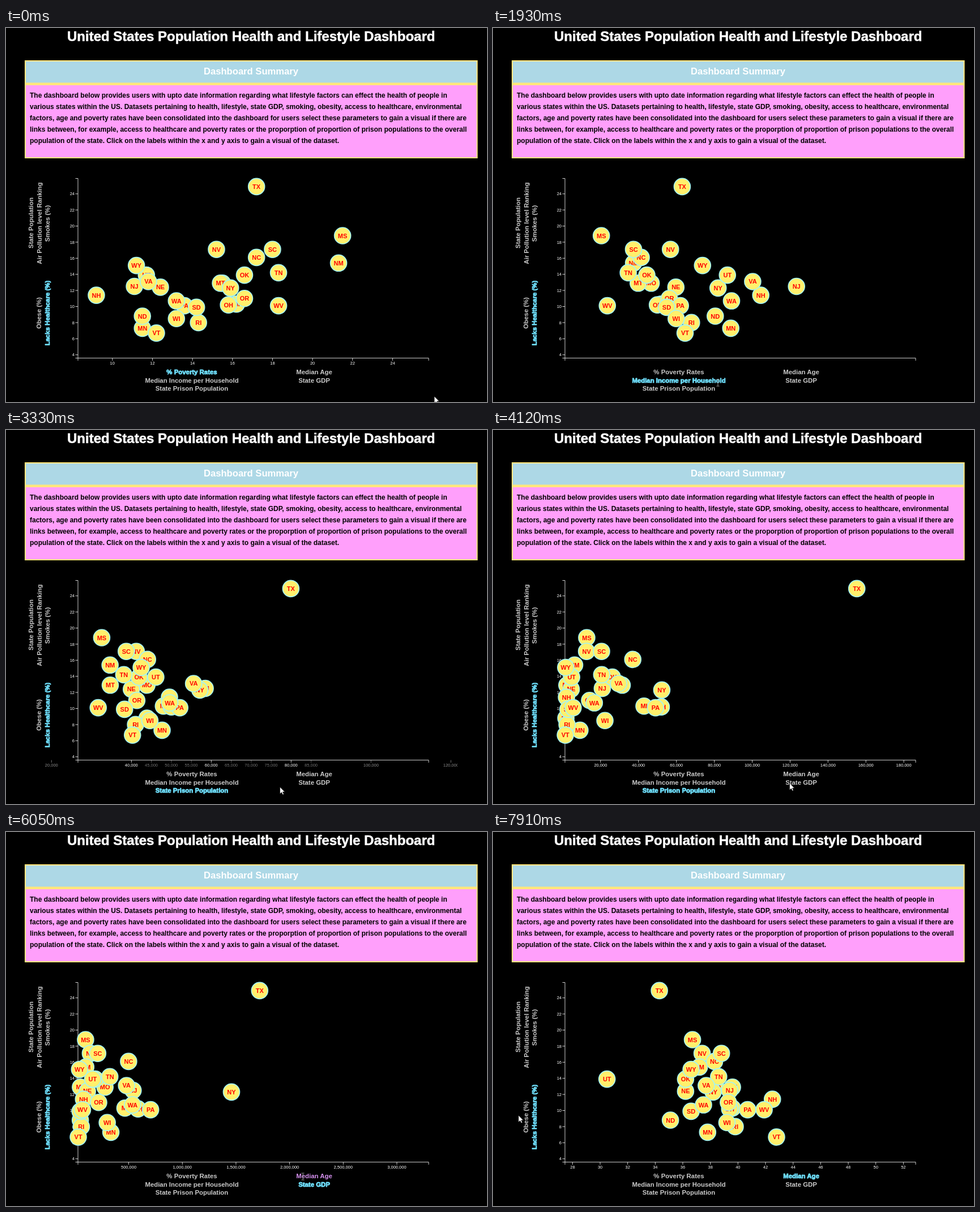
An HTML page that plays this animation: 849x660 px, repeating every 7.99 s.

```html
<!DOCTYPE html>
<html lang="en">
<head>
<meta charset="utf-8">
<title>Health Dashboard</title>
<style>
html, body { margin: 0; width: 100%; height: 100%; overflow: hidden; background: #000; }
svg { display: block; font-family: "Liberation Sans", Arial, sans-serif; }
.bold { font-weight: bold; }
.label { font-size: 11.4px; font-weight: bold; text-anchor: middle; fill: #c9c9c9; stroke-linejoin: round; }
.tick { font-size: 7.5px; fill: #fff; }
.line { fill: none; stroke: #fff; stroke-width: .8; }
.dot circle { fill: #fff06c; stroke: #a2f4f4; stroke-width: 1.6; }
.dot text { font-size: 11px; font-weight: bold; fill: #f00; text-anchor: middle; }
</style>
</head>
<body>
<svg id="stage" width="849" height="660">
  <clipPath id="chart"><rect x="33" y="240" width="764" height="420"/></clipPath>
  <text class="bold" x="108" y="23" font-size="24" fill="#fff" stroke="#fff" stroke-width=".5" stroke-linejoin="round">United States Population Health and Lifestyle Dashboard</text>
  <rect x="33" y="57" width="799.5" height="173" fill="#ffe77c"/>
  <rect x="35" y="59" width="795.5" height="37.5" fill="#add8e6"/>
  <rect x="35" y="101" width="795.5" height="127" fill="#ff9ffb"/>
  <text class="bold" x="432.5" y="82" font-size="16.6" text-anchor="middle" fill="#fff">Dashboard Summary</text>
  <g id="summary" class="bold" font-size="12"></g>
  <g id="axes" clip-path="url(#chart)"></g>
  <g id="dots"></g>
  <g id="labels"></g>
  <path id="arrow" d="M0 0V12L2.9 9.4 4.8 13.6 6.8 12.7 4.9 8.7H8.6Z" fill="#fff" stroke="#000" stroke-width=".6"/>
  <path id="beam" d="M-2.5-6H-.6L0-5.5.6-6H2.5M0-5.5V5.5M-2.5 6H-.6L0 5.5.6 6H2.5" fill="none" stroke="#999"/>
</svg>
<script>
const LOOP = 7990, DURATION = 1000;
const LEFT = 127, WIDTH = 619, TOP = 265.5, BOTTOM = 582.5;
const $ = id => document.getElementById(id);

function add(parent, tag, attrs, text) {
  const el = document.createElementNS('http://www.w3.org/2000/svg', tag);
  for (const k in attrs) el.setAttribute(k, attrs[k]);
  if (text !== undefined) el.textContent = text;
  return parent.appendChild(el);
}
const move = (el, x, y) => el.setAttribute('transform', `translate(${x.toFixed(2)} ${y.toFixed(2)})`);
const lerp = (a, b, k) => a + (b - a) * k;
const ramp = (t, start, len) => Math.max(0, Math.min(1, (t - start) / len));
const cubic = k => k < .5 ? 4 * k ** 3 : 1 - 4 * (1 - k) ** 3;
const mix = (a, b, k) => a.map((v, i) => lerp(v, b[i], k));

const states = 'MI MN MS MO MT NE NV NH NJ NM NY NC ND OH OK OR PA RI SC SD TN TX UT VT VA WA WV WI WY'.split(' ');
const uninsured = [10.3, 7.3, 18.8, 12.9, 12.9, 12.4, 17.1, 11.4, 12.5, 15.4, 12.3, 16.1, 8.8, 10.2, 13.9,
  11, 10.1, 8, 17.1, 9.9, 14.2, 24.9, 13.9, 6.7, 13.1, 10.7, 10.1, 8.5, 15.1];

// One entry per x measure, in the order they are clicked
const measures = [
  { name: '% Poverty Rates', x: 328, y: 611, min: 8.28, max: 25.8, step: 2, click: -1e4, hover: -1e4,
    data: [16.2, 11.5, 21.5, 15.5, 15.4, 12.4, 15.2, 9.2, 11.1, 21.3, 15.9, 17.2, 11.5, 15.8, 16.6,
      16.6, 13.6, 14.3, 18, 14.2, 18.3, 17.2, 11.7, 12.2, 11.8, 13.2, 18.3, 13.2, 11.2] },
  { name: 'Median Income per Household', x: 328, y: 625.5, min: 35712, max: 88765, step: 5000, click: 1151, hover: 860,
    data: [49847, 61481, 39680, 48363, 46328, 52686, 51450, 66532, 71919, 44803, 58878, 46556, 59029, 49308, 47529,
      51075, 53234, 54891, 45238, 50979, 44361, 53035, 60922, 54166, 64902, 61366, 41059, 52622, 57055] },
  { name: 'State Prison Population', x: 328, y: 640, min: 1200, max: 186240, step: 20000, click: 2812, hover: 2400,
    data: [42900, 9100, 12700, 31400, 2200, 4500, 12600, 2000, 20900, 6300, 52300, 37000, 1700, 52000, 26200,
      14200, 49000, 2300, 20500, 2800, 20600, 155200, 4700, 1400, 29500, 16700, 5500, 22300, 1600] },
  { name: 'State GDP', x: 544, y: 625.5, min: 27e3, max: 3296e3, step: 5e5, click: 4548, hover: 4250,
    data: [465, 334, 98, 279, 50, 115, 143, 79, 541, 100, 1458, 499, 49, 587, 188,
      220, 704, 58, 211, 47, 324, 1721, 164, 30, 480, 536, 69, 300, 42].map(v => v * 1000) },
  { name: 'Median Age', x: 544, y: 611, min: 27.45, max: 52.89, step: 2, click: 6167, hover: 5850,
    data: [39.6, 37.8, 36.7, 38.4, 39.6, 36.2, 37.4, 42.5, 39.4, 37.2, 38.2, 38.3, 35.1, 39.4, 36.2,
      39.3, 40.7, 39.8, 38.8, 36.6, 38.6, 34.3, 30.5, 42.8, 37.7, 37.5, 41.9, 39.2, 36.6] },
];
const scaleX = (m, v) => LEFT + (v - m.min) / (m.max - m.min) * WIDTH;
const scaleY = v => 576.7 - (v - 4) * 14.2;
const hasTick = (m, v) => v >= m.min && v <= m.max && v % m.step === 0;

['The dashboard below provides users with upto date information regarding what lifestyle factors can effect the health of people in',
 'various states within the US. Datasets pertaining to health, lifestyle, state GDP, smoking, obesity, access to healthcare, environmental',
 'factors, age and poverty rates have been consolidated into the dashboard for users select these parameters to gain a visual if there are',
 'links between, for example, access to healthcare and poverty rates or the proporption of proportion of prison populations to the overall',
 'population of the state. Click on the labels within the x and y axis to gain a visual of the dataset.',
].forEach((s, i) => add($('summary'), 'text', { x: 42, y: 122.5 + i * 20.1 }, s));

// Axes
add($('axes'), 'path', { class: 'line', d: `M122.5 ${TOP}H${LEFT}V${BOTTOM}H122.5M${LEFT} 587V${BOTTOM}H${LEFT + WIDTH}V587` });
for (let v = 4; v <= 24; v += 2) {
  const y = scaleY(v);
  add($('axes'), 'path', { class: 'line', d: `M122.5 ${y}H${LEFT}` });
  add($('axes'), 'text', { class: 'tick', x: 121, y: y + 2.7, 'text-anchor': 'end' }, v);
}
const ticks = new Map();
for (const m of measures)
  for (let v = Math.ceil(m.min / m.step) * m.step; v <= m.max; v += m.step) {
    if (ticks.has(v)) continue;
    const g = add($('axes'), 'g', { class: 'tick', 'text-anchor': 'middle' });
    add(g, 'path', { class: 'line', d: 'M0 0V4.5' });
    add(g, 'text', { y: 11.4 }, v.toLocaleString('en-US'));
    ticks.set(v, g);
  }

const dots = states.map(s => {
  const g = add($('dots'), 'g', { class: 'dot' });
  add(g, 'circle', { r: 14.5 });
  add(g, 'text', { y: 4 }, s);
  return g;
});

// Labels
const GRAY = [201, 201, 201], PLUM = [214, 145, 240], CYAN = [112, 226, 255];
const rgb = c => `rgb(${c.map(Math.round)})`;
const labels = measures.map(m => add($('labels'), 'text', { class: 'label', x: m.x, y: m.y }, m.name));
[['State Population', 48, 344], ['Air Pollution level Ranking', 62.5, 344.5], ['Smokes (%)', 77, 345],
 ['Obese (%)', 62, 503], ['Lacks Healthcare (%)', 77, 503]].forEach(([s, x, y], i) => {
  const el = add($('labels'), 'text', { class: 'label', transform: `translate(${x} ${y}) rotate(-90)` }, s);
  if (i === 4) el.style.cssText = `fill:${rgb(CYAN)};stroke:${rgb(CYAN)};stroke-width:.8`;
});

// Pointer path: time, x, y
const path = [[0, 756, 650], [850, 397, 626], [2230, 397, 626], [2630, 386, 637], [2810, 386, 637],
  [3250, 483, 630], [3640, 488, 630], [4280, 530, 622], [4430, 533, 621], [5450, 533, 621], [5900, 524, 608],
  [6170, 524, 608], [6500, 510, 612], [7140, 510, 612], [7700, 27, 505], [7910, 45, 500], [LOOP, 45, 500]];

function drawPointer(t) {
  const i = path.findIndex(p => p[0] > t);
  const [a, b] = [path[i - 1], path[i]];
  const r = ramp(t, a[0], b[0] - a[0]), k = r * r * (3 - 2 * r);
  const beam = t >= 800 && t < 2930 || t >= 4150 && t < 6350;
  for (const id of ['arrow', 'beam']) {
    $(id).style.display = (id === 'beam') === beam ? '' : 'none';
    move($(id), lerp(a[1], b[1], k), lerp(a[2], b[2], k));
  }
}

function draw(t) {
  const now = measures.findLastIndex(m => t >= m.click);
  const to = measures[now], from = measures[Math.max(0, now - 1)];
  const k = cubic(ramp(t, to.click, DURATION));

  dots.forEach((g, i) =>
    move(g, lerp(scaleX(from, from.data[i]), scaleX(to, to.data[i]), k), scaleY(uninsured[i])));

  for (const [v, g] of ticks) {
    const alpha = lerp(+hasTick(from, v), +hasTick(to, v), k);
    const x = lerp(scaleX(from, v), scaleX(to, v), k);
    const seen = alpha > .01 && x > 0 && x < 849;
    g.style.display = seen ? '' : 'none';
    if (!seen) continue;
    g.style.opacity = alpha;
    move(g, x, BOTTOM);
  }

  labels.forEach((el, i) => {
    const m = measures[i], next = measures[i + 1];
    let c = mix(GRAY, PLUM, ramp(t, m.hover, 150));
    c = mix(c, CYAN, ramp(t, m.click, 400));
    if (next) c = mix(c, GRAY, ramp(t, next.click, 400));
    el.style.fill = rgb(c);
    el.style.stroke = i === now ? rgb(c) : 'none';
    el.style.strokeWidth = .8;
  });
  drawPointer(t);
}

function frame() {
  draw(performance.now() % LOOP);
  requestAnimationFrame(frame);
}
frame();
</script>
</body>
</html>
```
